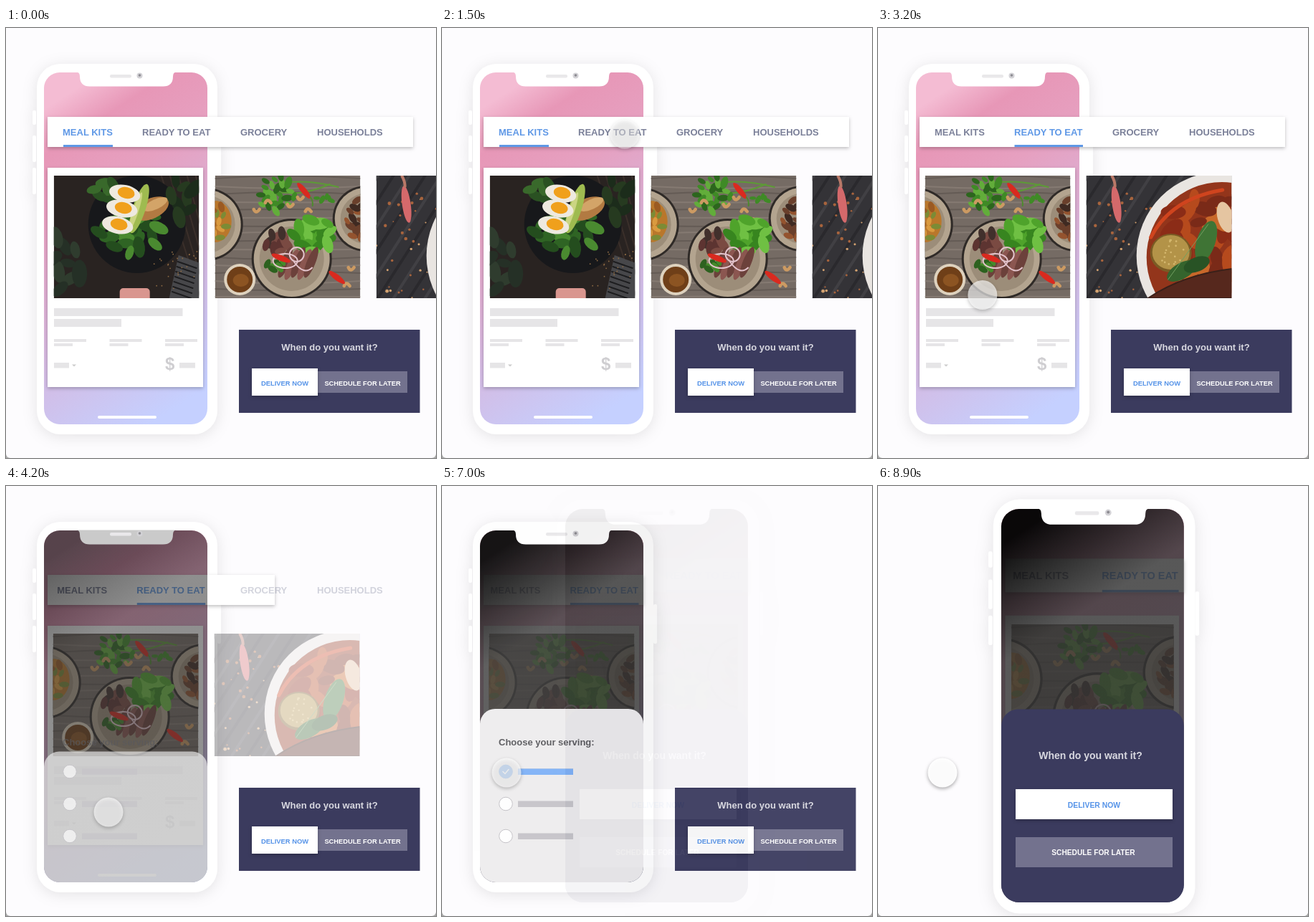
Recreate the animation shown at these times as an HTML page. Size 600x600 px, loop 9 s.

```html
<!DOCTYPE html>
<html lang="en">
<head>
<meta charset="utf-8">
<title>Meal ordering</title>
<style>
html, body { margin: 0; width: 100%; height: 100%; overflow: hidden; background: #aaa }
svg { display: block; width: 600px; height: 600px; border-radius: 0 0 6px 6px; background: #fdfcfe }
text { font: bold 13px "Liberation Sans", Arial, sans-serif }
.soft { filter: drop-shadow(0 2px 2.5px rgba(0,0,0,.25)) }
.mid { text-anchor: middle }
</style>
</head>
<body>
<svg viewBox="0 0 600 600">
  <defs>
    <linearGradient id="sky" x1=".35" y1="0" x2=".65" y2="1">
      <stop offset="0" stop-color="#f4bcd3"/><stop offset=".12" stop-color="#e797b7"/>
      <stop offset=".3" stop-color="#e6a0c0"/><stop offset="1" stop-color="#c5d0ff"/>
    </linearGradient>
    <linearGradient id="shade" x1=".3" y1="0" x2=".6" y2="1">
      <stop offset="0" stop-color="#000" stop-opacity=".96"/>
      <stop offset=".28" stop-color="#333" stop-opacity=".82"/>
      <stop offset="1" stop-color="#333" stop-opacity=".8"/>
    </linearGradient>
    <clipPath id="screen"><rect x="53" y="62" width="228" height="491" rx="22"/></clipPath>
    <clipPath id="frame"><rect width="202.5" height="171"/></clipPath>
  </defs>

  <g id="app">
    <g fill="#fff" style="filter:drop-shadow(0 3px 10px rgba(0,0,0,.1))">
      <rect x="43" y="50" width="252" height="517" rx="33"/>
      <rect x="37" y="115" width="5" height="20" rx="2"/><rect x="37" y="150" width="5" height="37" rx="2"/>
      <rect x="37" y="195" width="5" height="37" rx="2"/><rect x="295" y="165" width="5" height="55" rx="2"/>
    </g>
    <rect x="53" y="62" width="228" height="491" rx="22" fill="url(#sky)"/>
    <rect x="128" y="541" width="82" height="4" rx="2" fill="#fff"/>
    <rect class="soft" id="bar" x="58" y="124" width="510" height="42" fill="#fff"/>
    <g id="near">
      <text id="kits" x="79" y="150">MEAL KITS</text>
      <rect id="line1" x="80" y="163" width="69" height="3" fill="#5f98e6"/>
      <text id="ready" x="190" y="150">READY TO EAT</text>
      <rect id="line2" x="190.500" y="163" width="95.500" height="3" fill="#5f98e6"/>
    </g>
    <g id="far" fill="#7b8099"><text x="327" y="150">GROCERY</text><text x="434" y="150">HOUSEHOLDS</text></g>
    <rect class="soft" x="58" y="195" width="217" height="306" fill="#fff"/>
    <path id="stubs" fill="#e6e5e7"/>
    <path d="M92 469.500h6l-3 3z" fill="#ccc"/>
    <text x="222" y="477" fill="#cfced1" style="font-size:24px">$</text>
    <g id="photos"></g>
    <rect id="dim" x="53" y="62" width="228" height="491" rx="22" fill="url(#shade)"/>
    <path id="notch" d="M98 61.500q5 0 5 6q0 14 14 14h102q14 0 14-14q0-6 5-6z"/>
    <rect x="145" y="65" width="30" height="4.500" rx="2" fill="#e9e8ea"/>
    <circle cx="186.500" cy="66.500" r="4" fill="#d3d2d6"/><circle cx="186.500" cy="66" r="1.800" fill="#8d8c92"/>
  </g>

  <g clip-path="url(#screen)"><rect id="sheet" x="53" width="228" height="300" rx="21" fill="#eeedee"/></g>
  <g id="rows"></g>

  <rect x="325" y="421" width="252.500" height="116" fill="#3b3b5e"/>
  <text class="mid" x="451.500" y="450" fill="#d8d8e0">When do you want it?</text>
  <rect x="435" y="479" width="125" height="30" fill="#73728e"/>
  <rect class="soft" x="343" y="475" width="92" height="38" fill="#fff"/>
  <text class="mid" x="389" y="499" fill="#5593e8" style="font-size:9.400px">DELIVER NOW</text>
  <text class="mid" x="497.500" y="499" fill="#fff" style="font-size:9.300px">SCHEDULE FOR LATER</text>

  <g id="later">
    <rect width="600" height="600" fill="#fdfcfe"/>
    <g transform="translate(112.700 -37.300) scale(1.118)">
      <use href="#app"/>
      <g clip-path="url(#screen)"><rect x="53" y="312" width="228" height="300" rx="21" fill="#3b3b5e"/></g>
    </g>
    <text class="mid" x="296.500" y="381" fill="#d8d8e0" style="font-size:14px">When do you want it?</text>
    <rect class="soft" x="192" y="423" width="219" height="42" fill="#fff"/>
    <rect x="192" y="490" width="219" height="42" fill="#73728e"/>
    <text class="mid" x="301.500" y="449" fill="#5593e8" style="font-size:10.400px">DELIVER NOW</text>
    <text class="mid" x="300.500" y="515" fill="#fff" style="font-size:10.200px">SCHEDULE FOR LATER</text>
  </g>

  <circle id="finger" r="20.500" fill="#fff" style="filter:drop-shadow(0 2px 2.500px rgba(0,0,0,.35))"/>
</svg>
<script>
const $ = id => document.getElementById(id);
const set = (id, attrs) => { for (const k in attrs) $(id).setAttribute(k, attrs[k]); };
const disc = (x, y, r, fill, more = '') => `<circle cx="${x}" cy="${y}" r="${r}" fill="${fill}" ${more}/>`;
const oval = (x, y, rx, ry, fill, turn = 0) =>
  `<ellipse rx="${rx}" ry="${ry}" fill="${fill}" transform="translate(${x} ${y}) rotate(${turn})"/>`;
const path = (d, stroke, width, fill = 'none') =>
  `<path d="${d}" fill="${fill}" stroke="${stroke}" stroke-width="${width}" stroke-linecap="round"/>`;
const box = (fill) => `<rect width="203" height="171" fill="${fill}"/>`;
const rnd = n => { const v = Math.sin(n * 12.9898) * 43758.5453; return v - Math.floor(v); };
const many = (n, f) => Array.from({ length: n }, (_, i) => f(i)).join('');
// leaves scattered inside an oval
const leaves = (n, seed, x, y, w, h, size, colors) => many(n, i => {
  const a = i * 2.4, d = Math.sqrt((i + .5) / n), s = size * (.7 + .6 * rnd(i + seed));
  return oval(x + w * d * Math.cos(a), y + h * d * Math.sin(a), s, s * .55,
    colors[i % colors.length], rnd(i * 3 + seed) * 180);
});

function eggPlate() {
  const egg = (x, y) => oval(x, y, 22, 12, '#eee9df', 12) + oval(x + 2, y - 1, 12, 8, '#f0a01c', 12);
  return box('#292321') +
    many(7, i => path(`M${150 + i * 12} 0L${205 + i * 9} 171`, '#3a2f2a', 2)) +
    leaves(9, 2, 14, 122, 24, 44, 15, ['#253026', '#2f3c2e']) +
    disc(116, 68, 68, '#17181b') +
    leaves(8, 5, 180, 32, 22, 30, 13, ['#263a20', '#1c2c1b']) +
    leaves(20, 9, 108, 78, 48, 30, 13, ['#2f6424', '#4a8a30', '#244d1e']) +
    leaves(6, 4, 70, 22, 16, 18, 12, ['#39692b', '#2a5122']) +
    oval(136, 46, 26, 14, '#b27a42', -25) + oval(142, 40, 18, 7, '#d3a468', -25) +
    oval(119, 46, 9, 36, '#9fbb50', 18) + oval(114, 50, 4, 28, '#cbd582', 18) +
    egg(99, 25) + egg(95, 46) + egg(89, 69) +
    `<rect x="92" y="157" width="42" height="20" rx="5" fill="#d9968f"/>` +
    `<path d="M174 111l30 11v49h-43z" fill="#47474a"/>` +
    many(7, i => path(`M${173 - i * 1.3} ${120 + i * 7}l26 9`, '#1d1d1f', 2)) +
    many(26, i => disc(140 + 60 * rnd(i), 105 + 60 * rnd(i + 50), .9, '#8d6a43'));
}

function steakPlate() {
  const plate = (x, y, r) => disc(x, y, r, '#2f2a27') + disc(x, y, r - 3, '#b3a48f') + disc(x, y, r - 11, '#9c8d79');
  const chili = (x, y, turn) => oval(x, y, 14, 4, '#d92a1f', turn);
  const nuts = [[74, 38], [105, 40], [130, 50], [58, 47], [143, 64], [190, 128], [184, 154], [119, 30]];
  return box('#756b64') +
    many(16, i => path(`M0 ${i * 11 + 4}q100 ${rnd(i) * 14 - 7} 203 0`, i % 2 ? '#857a72' : '#645b55', 2)) +
    plate(-12, 68, 51) + oval(0, 64, 23, 29, '#b9772b') + leaves(12, 3, 2, 64, 17, 24, 6, ['#d99a3f', '#9b5a22', '#7c8b35']) +
    plate(210, 60, 46) + leaves(18, 7, 200, 62, 16, 30, 7, ['#6a3f2b', '#3f2a22', '#94532e']) +
    path('M78 14Q120 2 172 16M84 22Q120 30 160 12', '#5d9a36', 2) +
    leaves(24, 12, 86, 26, 26, 26, 7, ['#3f8a26', '#62ad3a', '#2c661d']) +
    leaves(5, 15, 155, 32, 14, 4, 5, ['#3f8a26']) +
    nuts.map(([x, y], i) => path(`M${x - 4} ${y}q3 ${i % 2 ? 7 : -7} 8 0`, '#cc9a62', 4.5)).join('') +
    plate(107, 116, 56) +
    leaves(20, 6, 137, 82, 29, 23, 12, ['#4fa32b', '#6fc043', '#37851f']) +
    leaves(12, 8, 86, 92, 18, 14, 9, ['#5d3431', '#41302c', '#7a4a42']) +
    many(5, i => oval(98 + i * 9, 121 + i % 2 * 3, 6, 23, i % 2 ? '#8b5650' : '#6c413b', 22)) +
    leaves(7, 10, 84, 124, 14, 7, 6, ['#2d611f', '#458a2b']) +
    `<g fill="none" stroke="#e3c3cb" stroke-width="2"><circle cx="114" cy="110" r="10"/><ellipse cx="98" cy="119" rx="17" ry="10"/><path d="M110 120q14 20 26 8"/></g>` +
    chili(92, 115, 22) + chili(124, 21, 50) + chili(170, 142, 38) + path('M133 30q4 5 3 12', '#4d8a2c', 2) +
    disc(34.5, 145, 22, '#ded2be') + disc(34.5, 145, 18, '#6f3f18') + oval(36, 146, 11, 9, '#8c5422');
}

function soupBowl() {
  return box('#343337') +
    many(15, i => path(`M${i * 22 - 130} 171L${i * 22 - 20} 0`, i % 2 ? '#414044' : '#2a292d', 4)) +
    many(48, i => disc(110 * rnd(i + 3), 25 + 146 * rnd(i + 80), .8 + 1.6 * rnd(i + 9), i % 3 ? '#a8643d' : '#d3a270')) +
    oval(42, 40, 6, 26, '#d4696b', -8) + path('M36 1q4 7 4 14', '#b97968', 4) +
    disc(187, 112, 117, '#e9e5e1') + disc(189, 114, 105, '#93351b') +
    leaves(34, 20, 170, 96, 62, 74, 17, ['#b64a1d', '#8b2c17', '#c8682a', '#7a2a18']) +
    path('M90 86Q118 32 190 20', '#cf441e', 5) +
    oval(118, 108, 29, 27, '#7a5b24') + oval(118, 107, 26, 24, '#b39348') +
    many(18, i => disc(118 + 18 * Math.cos(i * 2.4) * rnd(i), 107 + 17 * Math.sin(i * 2.4), 1.3, '#d5b86e')) +
    oval(194, 58, 11, 22, '#e5c5a1', -15) +
    path('M86 171Q135 138 203 130V171z', '#3a2019', 2, '#56281d') +
    oval(133, 133, 23, 11, '#35642d', -30) + oval(167, 92, 13, 30, '#3f7435', 18) +
    oval(154, 124, 19, 10, '#285325', -22) + path('M114 145L170 68', '#72a061', 1);
}

$('photos').innerHTML = [eggPlate, steakPlate, soupBowl].map((draw, i) =>
  `<g id="photo${i}"><g clip-path="url(#frame)">${draw()}</g></g>`).join('');

const rect = (x, y, w, h) => `M${x} ${y}h${w}v${h}h${-w}z`;
set('stubs', { d: rect(67, 391, 179.5, 11) + rect(67, 406, 94, 11) + rect(67, 467, 21, 7.5) + rect(242, 467, 22, 7.5) +
  [67, 144.5, 222].map(x => rect(x, 434, 45, 4) + rect(x, 440, 26, 4)).join('') });

const row = (y, fill, edge, bar) =>
  disc(89, y, 9.3, fill, `stroke="${edge}"`) + `<rect x="106" y="${y - 4}" width="77" height="8.500" fill="${bar}"/>`;
$('rows').innerHTML = '<text x="79" y="362" fill="#59595d">Choose your serving:</text>' +
  [398.5, 443.5, 488.5].map(y => row(y, '#fff', '#c3c1c6', '#c6c4c9')).join('') +
  `<g id="picked">${row(398.5, '#5f9df0', '#5f9df0', '#7fb2f7')}${path('M85 398.500l3 3l5-6', '#fff', 1.5)}</g>`;

const span = (t, from, length) => Math.min(1, Math.max(0, (t - from) / length));
const smooth = u => u * u * (3 - 2 * u);
const mix = (a, b, u) => a + (b - a) * u;
const blend = (a, b, u) => `rgb(${a.map((v, i) => Math.round(mix(v, b[i], u)))})`;
const GREY = [123, 128, 153], BLUE = [95, 152, 230];

function fingerAt(t) {
  const a = smooth(span(t, 300, 800)), b = smooth(span(t, 2600, 942)), c = smooth(span(t, 5100, 800));
  if (c) return [mix(143, 90, c), mix(455, 400, c)];
  const bend = (p, q, r) => (1 - b) ** 2 * p + 2 * b * (1 - b) * q + b * b * r;
  if (b) return [bend(255, 126, 143), bend(148, 323, 455)];
  return [mix(625, 255, a), mix(43, 148, a)];
}

function draw(t) {
  const slide = smooth(span(t, 1520, 520));
  const open = 1 - (1 - span(t, 4000, 470)) ** 2;
  const late = span(t, 6950, 1080);

  set('kits', { fill: blend(BLUE, GREY, slide) });
  set('ready', { fill: blend(GREY, BLUE, slide) });
  set('line1', { opacity: 1 - slide });
  set('line2', { opacity: slide });
  [1 - slide, 1, 1 - open].forEach((opacity, i) =>
    set('photo' + i, { opacity, transform: `translate(${66.7 + i * 225 - 226 * slide} 206)` }));

  set('bar', { width: mix(510, 223, open) });
  set('near', { transform: `translate(${-11.5 * open})` });
  set('far', { opacity: 1 - open });
  set('dim', { opacity: open });
  const v = Math.round(255 - 240 * open * (1 - open));
  set('notch', { fill: `rgb(${v},${v},${v})` });
  set('sheet', { y: mix(493, 311, open), opacity: open });
  set('rows', { opacity: open });
  set('picked', { opacity: span(t, 6000, 200) });
  set('later', { opacity: late });

  const [cx, cy] = fingerAt(t);
  set('finger', { cx, cy, 'fill-opacity': mix(mix(.45, .65, span(t, 1520, 200)), .95, late) });
}

function tick() {
  draw(performance.now() % 9000);
  requestAnimationFrame(tick);
}
tick();
</script>
</body>
</html>
```
